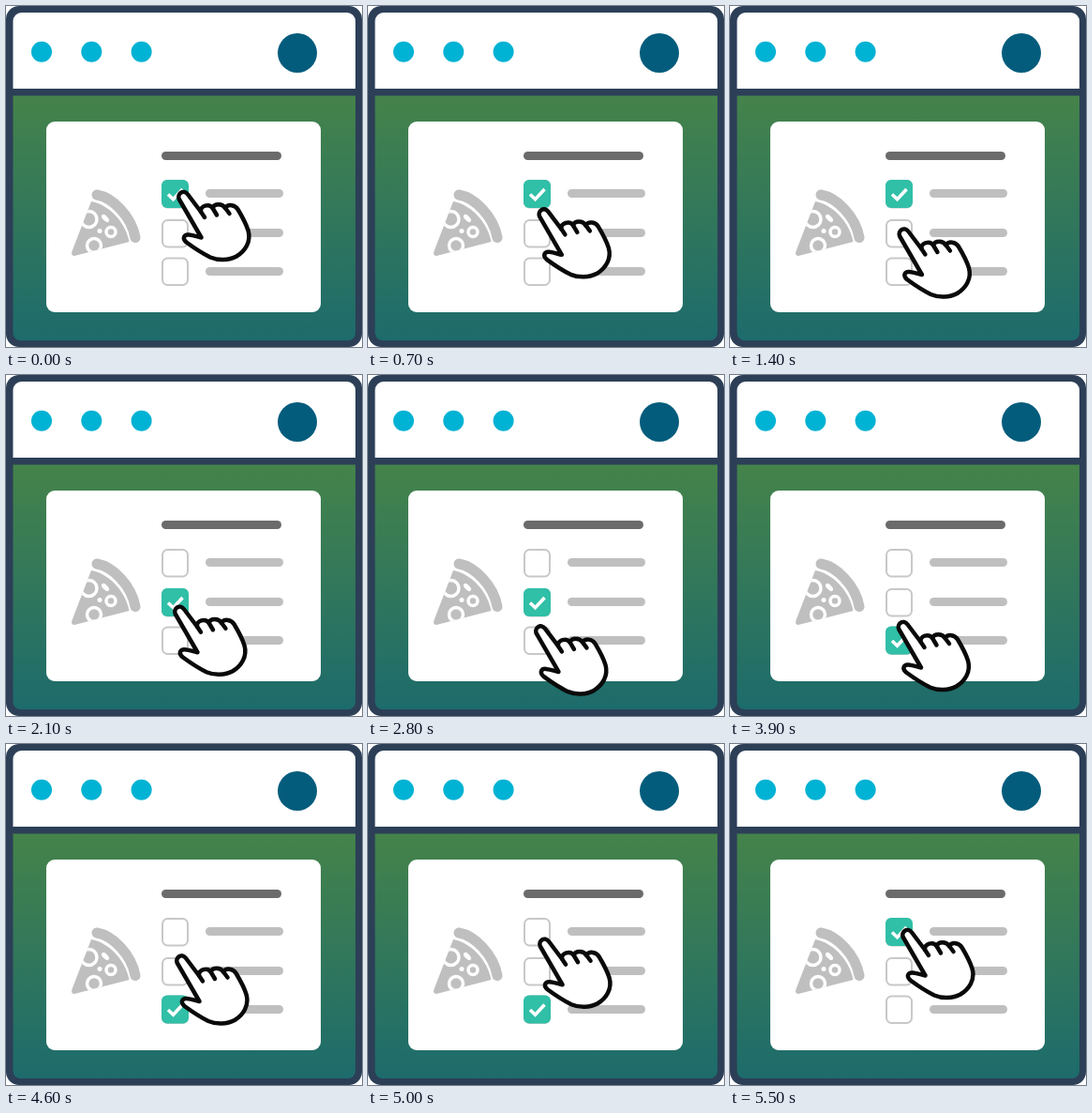
These frames come from a looping animation (380x363 px, 5700 ms). An HTML page:

```html
<!DOCTYPE html>
<html lang="en">
<head>
<meta charset="utf-8">
<title>Pick an option</title>
<style>
  html, body { margin: 0; width: 100%; height: 100%; overflow: hidden; background: #fff; }
  svg { display: block; width: 100%; height: 100%; }
</style>
</head>
<body>
<svg viewBox="0 0 380 363">
  <defs>
    <linearGradient id="page" x1="0" y1="0" x2="0" y2="1">
      <stop offset="0" stop-color="#45834a"/>
      <stop offset="1" stop-color="#1d6b6c"/>
    </linearGradient>
    <clipPath id="slice"><path d="M91 208C108 211 127 228 131.500 251L73 266Q69 266 70.500 261Z"/></clipPath>
    <g id="box">
      <rect x="167" y="186" width="27" height="28.500" rx="5.500" fill="#fff" stroke="#c8c8c8" stroke-width="2"/>
      <g class="on">
        <rect x="166" y="185" width="29" height="30" rx="6" fill="#30bfa7"/>
        <path d="M173 200.500l5.500 5.200L188.500 195" fill="none" stroke="#fff" stroke-width="3.600"/>
      </g>
    </g>
  </defs>

  <!-- window -->
  <rect width="380" height="363" rx="14" fill="#2c3f57"/>
  <path d="M7.500 88V16a9 9 0 0 1 9-9H364a9 9 0 0 1 9 9V88Z" fill="#fff"/>
  <path d="M7.500 95.500H373V348a8 8 0 0 1-8 8H15.500a8 8 0 0 1-8-8Z" fill="url(#page)"/>
  <g fill="#00b2d3">
    <circle cx="38" cy="48.800" r="11"/>
    <circle cx="91.300" cy="48.800" r="11"/>
    <circle cx="144.600" cy="48.800" r="11"/>
  </g>
  <circle cx="311" cy="50" r="21" fill="#045c7c"/>
  <rect x="43" y="123" width="293" height="203" rx="9" fill="#fff"/>

  <!-- pizza -->
  <path d="M97 201C114 204 134 224 138 246.500" fill="none" stroke="#bfbfbf" stroke-width="11" stroke-linecap="round"/>
  <g clip-path="url(#slice)">
    <rect x="65" y="200" width="75" height="70" fill="#bfbfbf"/>
    <g fill="none" stroke="#fff" stroke-width="3.500">
      <circle cx="88.500" cy="227" r="8.500"/>
      <circle cx="94" cy="255" r="7.500"/>
      <circle cx="112" cy="240.500" r="5"/>
    </g>
    <ellipse cx="106" cy="226" rx="5" ry="2.600" transform="rotate(45 106 226)" fill="#fff"/>
    <circle cx="100" cy="239.500" r="2.500" fill="#fff"/>
  </g>

  <!-- options -->
  <rect x="166" y="155" width="128" height="9" rx="4.500" fill="#6b6b6b"/>
  <g fill="#bfbfbf">
    <rect x="213" y="195" width="83" height="9" rx="4.500"/>
    <rect x="213" y="237" width="83" height="9" rx="4.500"/>
    <rect x="213" y="278" width="83" height="9" rx="4.500"/>
  </g>
  <g id="boxes" fill="none"></g>

  <g id="hand" fill="none" stroke="#0a0a0a" stroke-width="4.500" stroke-linecap="round" stroke-linejoin="round">
    <path fill="#fff" d="M184.700 205.500C182.500 200 189.500 194.500 194 200.500L208 219C207 212.500 217 210 220.500 215C222.500 210 231 210 234 215C237 210.500 244.500 211.500 247.500 216.500C252 224 256 231 258.500 239C262 251 255 261 246 266.500C238 271 226 271 218 267.500C209 263 200 257 192.500 251.500C187.500 247 190.500 243 195 243.500C200 244 204 245.500 208.500 246.500Z"/>
    <path d="M208 219l4 6M220.500 215l4.500 7.500M234 215l4.500 6"/>
  </g>
</svg>
<script>
  const LOOP = 5700, TICK = 100;

  // [time, x, y] offsets of the hand from its resting place
  const handSteps = [
    [0, 0, 0], [200, 0, 0], [800, -2, 22], [1400, -3.6, 39.5], [1800, -3.6, 39.5],
    [2400, -4.5, 58], [3100, -5.5, 78], [3600, -5.5, 78], [3900, -4.5, 65],
    [4200, -3.5, 48.5], [4600, -2, 27.500], [4800, -1.5, 17], [5200, -0.4, 2.5],
    [5500, 0, 0], [LOOP, 0, 0]
  ];

  // [time, opacity] of the checked state for each box
  const checkSteps = [
    [[0, 1], [1400, 1], [1700, 0], [5100, 0], [5400, 1], [LOOP, 1]],
    [[0, 0], [1400, 0], [1700, 1], [3200, 1], [3500, 0], [LOOP, 0]],
    [[0, 0], [3200, 0], [3500, 1], [5100, 1], [5400, 0], [LOOP, 0]]
  ];

  const svgNS = "http://www.w3.org/2000/svg";
  const hand = document.getElementById("hand");
  const boxes = document.getElementById("boxes");
  const template = document.getElementById("box");

  const checks = [0, 42, 82.5].map(y => {
    const box = document.createElementNS(svgNS, "g");
    box.setAttribute("transform", `translate(0 ${y})`);
    for (const part of template.children) box.append(part.cloneNode(true));
    boxes.append(box);
    return box.querySelector(".on");
  });

  function valueAt(steps, time, column) {
    const next = Math.max(1, steps.findIndex(step => step[0] >= time));
    const a = steps[next - 1], b = steps[next];
    return a[column] + (b[column] - a[column]) * (time - a[0]) / (b[0] - a[0]);
  }

  function draw(now) {
    const time = Math.floor((now % LOOP) / TICK) * TICK;
    const x = valueAt(handSteps, time, 1), y = valueAt(handSteps, time, 2);
    hand.setAttribute("transform", `translate(${x} ${y})`);
    checks.forEach((check, i) => check.setAttribute("opacity", valueAt(checkSteps[i], time, 1)));
  }

  const start = performance.now();
  function loop() {
    draw(performance.now() - start);
    requestAnimationFrame(loop);
  }
  loop();
</script>
</body>
</html>
```
